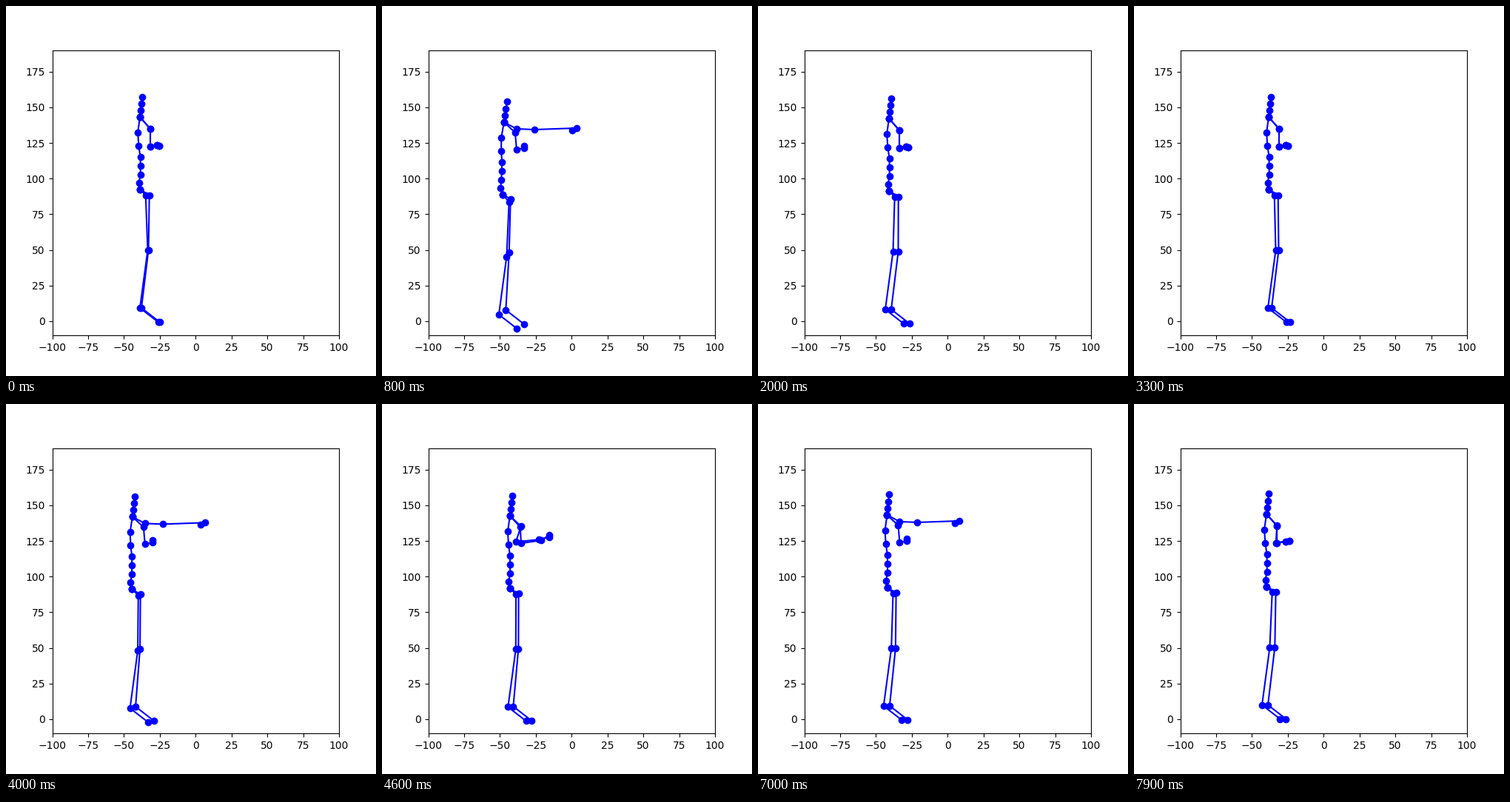
Recreate the animation shown at these times as a matplotlib script. Size 500 px wide and 500 px high, loop 8000 ms.

```python
import numpy as np
import matplotlib.pyplot as plt
from matplotlib.animation import FuncAnimation

FRAMES, STEP = 80, 100
SHIN, LEG_DROP = 78, 258
FOOT = np.array([24.5, 19])

# Head to pelvis, relative to the neck, in pixels
SPINE = np.array([(3, -27.5), (2, -18), (1, -9), (0, 0), (-3, 21), (-2, 39),
                  (0, 54), (0, 66), (0, 78), (-2, 89), (0, 98)])

# Shoulder, elbow, wrist and hand, relative to the neck
GUARD = np.array([(14, 16), (14, 40), (22.5, 38), (25.5, 38.5)])
REACH = np.array([(15, 14), (8, 35), (39, 32), (53, 29)])
COVER = np.array([(14, 15), (15, 37), (42, 33), (53, 26)])
JAB = np.array([(17, 9), (41, 10), (98, 8), (92, 11)])
BRACE = np.array([(15, 14), (17, 37), (27, 35), (27, 32)])

# Resting stance: time, neck x, neck y, back ankle x, front ankle x
REST = np.array([(0, 181, 150, 181, 183), (2000, 177, 152, 172, 180),
                 (3300, 182, 150, 181, 186), (6000, 178, 151, 175, 183),
                 (7900, 179.5, 148.7, 173.5, 181.5)])

# Time of full stretch and how far the body leans back
PUNCHES = [(950, 1.0), (4000, 0.7), (7000, 0.3)]


def ease(t, start, end):
    u = np.clip((t - start) / (end - start), 0, 1)
    return u * u * (3 - 2 * u)


def pulse(t, rise, peak, fall, end):
    return ease(t, rise, peak) * (1 - ease(t, fall, end))


def action(t):
    """Arm raise, arm stretch and body lean, each from 0 to 1."""
    lift = stretch = lean = 0
    for peak, depth in PUNCHES:
        dt = t - peak
        lift += pulse(dt, -650, -350, 650, 1000)
        stretch += pulse(dt, -450, -150, 100, 600)
        lean += depth * pulse(dt, -650, -150, 350, 1050)
    return lift, stretch, lean


def arm(neck, raised, final, lift, stretch):
    pose = GUARD + (raised - GUARD) * lift
    pose = pose + (final - pose) * stretch
    return np.vstack([neck, neck + pose])


def leg(pelvis, hip, ankle, knee_dx):
    return np.array([pelvis, pelvis + hip, ankle + [knee_dx, -SHIN],
                     ankle, ankle + FOOT])


def skeleton(t):
    lift, stretch, lean = action(t)
    x, y, back_x, front_x = (np.interp(t, REST[:, 0], col)
                             for col in REST[:, 1:].T)
    crouch = lean ** 3
    shift = -14.5 * lean
    ground = y + LEG_DROP
    neck = np.array([x + shift, y + 6.2 * crouch])

    spine = neck + SPINE
    drop = SPINE[:, 1] / 98
    curve = 0.4 - 2.4 * crouch
    spine[:, 0] += curve * (drop + np.sin(np.pi * drop * np.abs(drop)))

    pelvis = spine[-1]
    twist, tilt = 2.5 - 1.5 * lean, 2 * crouch
    back_ankle = np.array([back_x + shift - 5 * crouch, ground + 8.2 * crouch])
    front_ankle = np.array([front_x + shift, ground + 2 * crouch])
    back = leg(pelvis, [9.8 - twist, 7.5 + tilt], back_ankle, 10.5)
    front = leg(pelvis, [9.8 + twist, 7.5 - tilt], front_ankle, 9.5 - 5 * lean)

    lead = arm(neck, REACH, JAB, lift, stretch)
    rear = arm(neck, COVER, BRACE, lift, stretch)
    return [spine, back, front, lead, rear]


fig, ax = plt.subplots(figsize=(5, 5), dpi=100)
ax.set_xlim(-100, 100)
ax.set_ylim(-10, 190)
lines = [ax.plot([], [], "bo-")[0] for _ in range(5)]


def update(frame):
    for line, pts in zip(lines, skeleton(frame * STEP)):
        line.set_data((pts[:, 0] - 62.5) / 1.9375 - 100,
                      190 - (pts[:, 1] - 60) / 1.925)
    return lines


anim = FuncAnimation(fig, update, frames=FRAMES, interval=STEP,
                     init_func=lambda: update(0), repeat=True, repeat_delay=0)
plt.show()
```
